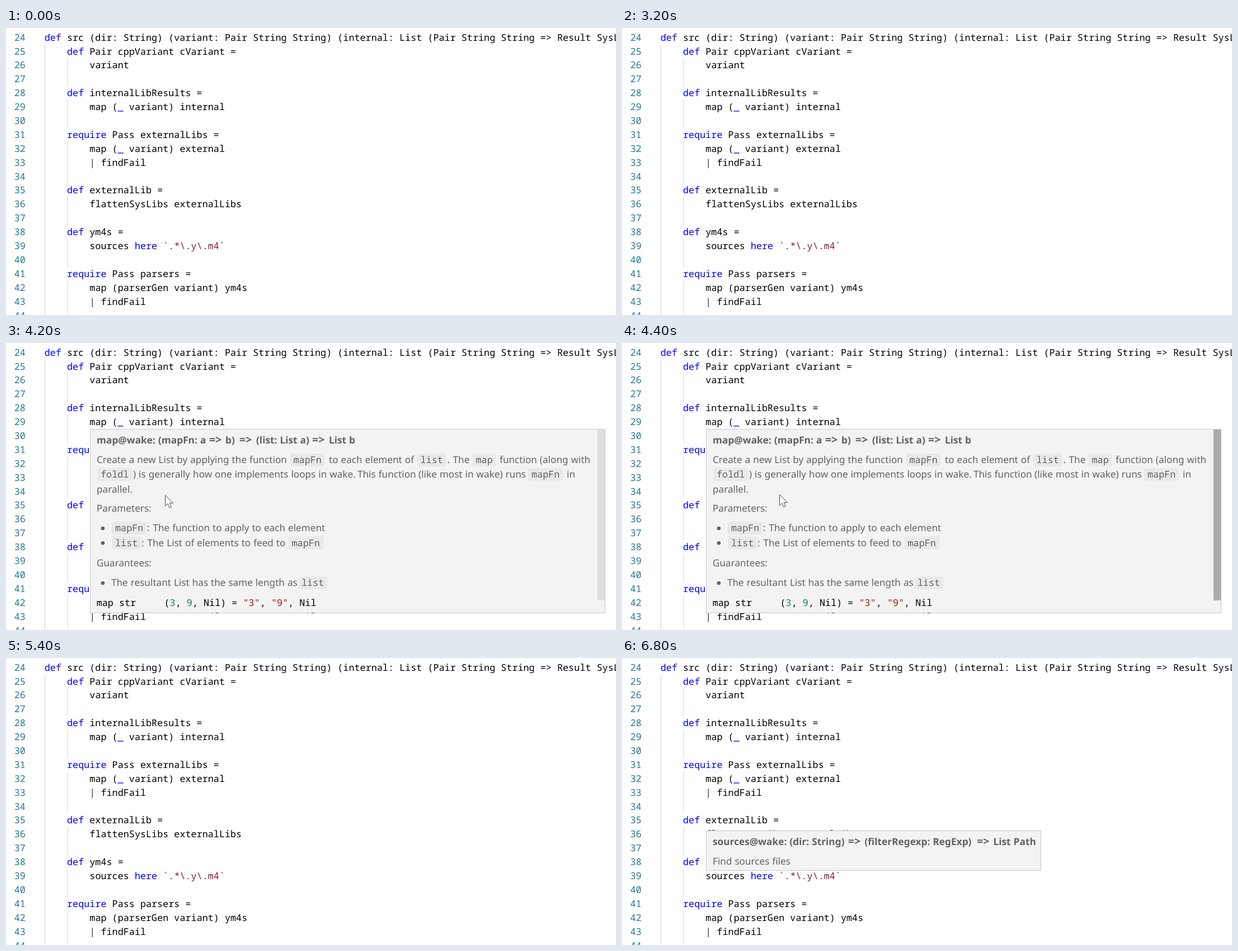
An HTML page that plays this animation: 1090x514 px, repeating every 7.2 s.

```html
<!DOCTYPE html>
<html lang="en">
<head>
<meta charset="utf-8">
<title>Code editor hover hints</title>
<style>
html, body { margin: 0; width: 100%; height: 100%; overflow: hidden; background: #fff; }
svg { display: block; }
text { white-space: pre; text-rendering: geometricPrecision; }
.code { font: 16.8px "Noto Sans Mono", monospace; fill: #000; }
.prose { font: 17.15px "Noto Sans", sans-serif; word-spacing: .5px; fill: #616161; }
.bold { font: bold 17.3px "Noto Sans", sans-serif; word-spacing: .5px; fill: #616161; }
.arrow { font-size: 19.5px; font-weight: 600; }
.number { fill: #237893; }
.keyword { fill: #00f; }
.regex { fill: #811f3f; }
.string { fill: #a31515; }
.digit { fill: #098658; }
.pipe { fill: #40301a; }
.chip { fill: #616161; }
.chip-box { fill: #e9e9e9; }
.guide { fill: #d3d3d3; }
.panel { fill: #f3f3f3; stroke: #c8c8c8; }
.bullet { fill: #616161; }

.hint, #scroll, #thumb, #pointer { animation: 7.2s step-end infinite; }
.hint { opacity: 0; }
#variantHint { animation-name: variant-hint; }
#mapHint { animation-name: map-hint; }
#sourcesHint { animation-name: sources-hint; }
#scroll { animation-name: scroll; }
#thumb { animation-name: thumb; }
#pointer { opacity: 0; animation-name: pointer; }

@keyframes variant-hint { 0%, 27.77% { opacity: 0; } 19.44% { opacity: 1; } }
@keyframes map-hint { 0%, 75% { opacity: 0; } 50% { opacity: 1; } }
@keyframes sources-hint { 0% { opacity: 0; } 83.33% { opacity: .1; } 86.11%, 100% { opacity: 1; } }
@keyframes scroll {
  0% { transform: none; }
  63.88%, 100% { transform: translateY(-23.7px); }
}
@keyframes thumb {
  0% { transform: none; fill: #f3f3f3; }
  58.33% { transform: none; fill: #dedede; }
  61.11% { transform: none; fill: #ababab; }
  63.88%, 100% { transform: translateY(23px); fill: #ababab; }
}
@keyframes pointer {
  0% { opacity: 0; transform: translate(284px, 272px); }
  58.33% { opacity: 1; transform: translate(284px, 272px); }
  61.11% { opacity: 1; transform: translate(281px, 271px); }
  63.88% { opacity: 1; transform: translate(268px, 267px); }
  66.66% { opacity: 1; transform: translate(245px, 260px); }
  69.44% { opacity: 1; transform: translate(222px, 253px); }
  72.22% { opacity: 1; transform: translate(207px, 248px); }
  75%, 100% { opacity: 0; transform: translate(143px, 290px); }
}
</style>
</head>
<body>
<svg width="1090" height="514" viewBox="0 0 1090 514">
  <defs><clipPath id="inside"><rect x="151" y="155" width="919" height="328.5"/></clipPath></defs>
  <g id="editor"></g>
  <g id="variantHint" class="hint"><rect class="panel" x="150.5" y="18.5" width="240" height="37"/></g>
  <g id="mapHint" class="hint">
    <rect class="panel" x="150.5" y="154.5" width="920" height="329"/>
    <g clip-path="url(#inside)">
      <g id="scroll"></g>
      <rect id="thumb" x="1057" y="155" width="13" height="306"/>
    </g>
  </g>
  <g id="sourcesHint" class="hint"><rect class="panel" x="150.5" y="309.5" width="598" height="71"/></g>
  <path id="pointer" d="M.5 .5V20L5 15.8 8.2 23 11.4 21.6 8.3 14.6H14.6Z" fill="#fff" stroke="#444"/>
</svg>
<script>
const CHAR = 10.08, LEFT = 68.7, LINE = 24.89, BASE = 22.7, FIRST = 24;

const source = `def src (dir: String) (variant: Pair String String) (internal: List (Pair String String => Result SysLib
    def Pair cppVariant cVariant =
        variant

    def internalLibResults =
        map (_ variant) internal

    require Pass externalLibs =
        map (_ variant) external
        | findFail

    def externalLib =
        flattenSysLibs externalLibs

    def ym4s =
        sources here \`.*\\.y\\.m4\`

    require Pass parsers =
        map (parserGen variant) ym4s
        | findFail
`.split("\n");

const tokens = /(?<keyword>\b(?:def|require|here|_)\b)|(?<regex>`[^`]*`)|(?<string>"[^"]*")|(?<digit>\b\d+\b)|(?<pipe>\|)/g;
const byId = id => document.getElementById(id);

function add(parent, tag, attrs, content = "") {
  const node = document.createElementNS("http://www.w3.org/2000/svg", tag);
  for (const key in attrs) node.setAttribute(key, attrs[key]);
  node.textContent = content;
  parent.append(node);
  return node;
}

const write = (parent, x, y, cls, content) => add(parent, "text", { x, y, class: cls }, content);

function writeCode(parent, x, y, line) {
  const node = write(parent, x, y, "code", "");
  let end = 0;
  for (const match of line.matchAll(tokens)) {
    const kind = Object.keys(match.groups).find(name => match.groups[name]);
    node.append(line.slice(end, match.index));
    add(node, "tspan", { class: kind }, match[0]);
    end = match.index + match[0].length;
  }
  node.append(line.slice(end));
}

// Pieces alternate between x and text.
function writeRow(parent, y, cls, ...pieces) {
  for (let i = 0; i < pieces.length; i += 2) {
    const content = pieces[i + 1];
    write(parent, pieces[i], y, content === "=>" ? cls + " arrow" : cls, content);
  }
}

function chip(parent, x, y, content) {
  add(parent, "rect", {
    class: "chip-box", x: x - 6, y: y - 17, rx: 4,
    width: content.length * CHAR + 12, height: 23
  });
  write(parent, x, y, "code chip", content);
}

const editor = byId("editor");
add(editor, "rect", { class: "guide", x: 69, y: 29.5, width: 1, height: 485 });
source.forEach((line, i) => {
  const y = BASE + i * LINE;
  const code = line.trimStart();
  const indent = line.length - code.length;
  write(editor, 14.7, y, "code number", FIRST + i);
  if (i && indent !== 4)
    add(editor, "rect", { class: "guide", x: 109.5, y: y - 18, width: 1, height: LINE });
  writeCode(editor, LEFT + indent * CHAR, y, code);
});

writeRow(byId("variantHint"), 45.5, "bold", 162, "variant: Pair String String");

const sources = byId("sourcesHint");
writeRow(sources, 335, "bold", 162, "sources@wake: (dir: String)", 404, "=>",
  433.5, "(filterRegexp: RegExp)", 634, "=>", 663.5, "List Path");
writeRow(sources, 370, "prose", 162, "Find sources files");

const doc = byId("scroll");
writeRow(doc, 180, "bold", 162, "map@wake: (mapFn: a", 363, "=>", 392, "b)", 417, "=>",
  447, "(list: List a)", 547, "=>", 577, "List b");
writeRow(doc, 215, "prose", 162, "Create a new List by applying the function",
  577, "to each element of", 789, ". The", 882, "function (along with");
writeRow(doc, 241.3, "prose", 227, ") is generally how one implements loops in wake.",
  628, "This function", 737, "(like most in wake) runs", 1002, "in");
writeRow(doc, 267.5, "prose", 162, "parallel.");
writeRow(doc, 302.3, "prose", 162, "Parameters:");
writeRow(doc, 337.2, "prose", 252, ":", 262.5, "The function to apply to each element");
writeRow(doc, 363.5, "prose", 242, ":", 252.5, "The List of elements to feed to");
writeRow(doc, 400, "prose", 162, "Guarantees:");
writeRow(doc, 435.2, "prose", 188, "The resultant List has the same length as");

chip(doc, 513.5, 215, "mapFn");
chip(doc, 740.5, 215, "list");
chip(doc, 839.5, 215, "map");
chip(doc, 169, 241.3, "foldl");
chip(doc, 939, 241.3, "mapFn");
chip(doc, 195, 337.2, "mapFn");
chip(doc, 195, 363.5, "list");
chip(doc, 510.5, 363.5, "mapFn");
chip(doc, 528, 435.2, "list");
for (const cy of [332, 358.3, 430]) add(doc, "circle", { class: "bullet", cx: 173, cy, r: 3.3 });

writeCode(doc, 161.7, 470.7, 'map str     (3, 9, Nil) = "3", "9", Nil');
writeCode(doc, 161.7, 495.6, "map (_+100) (3, 9, Nil) = 103, 109, Nil");
</script>
</body>
</html>
```
